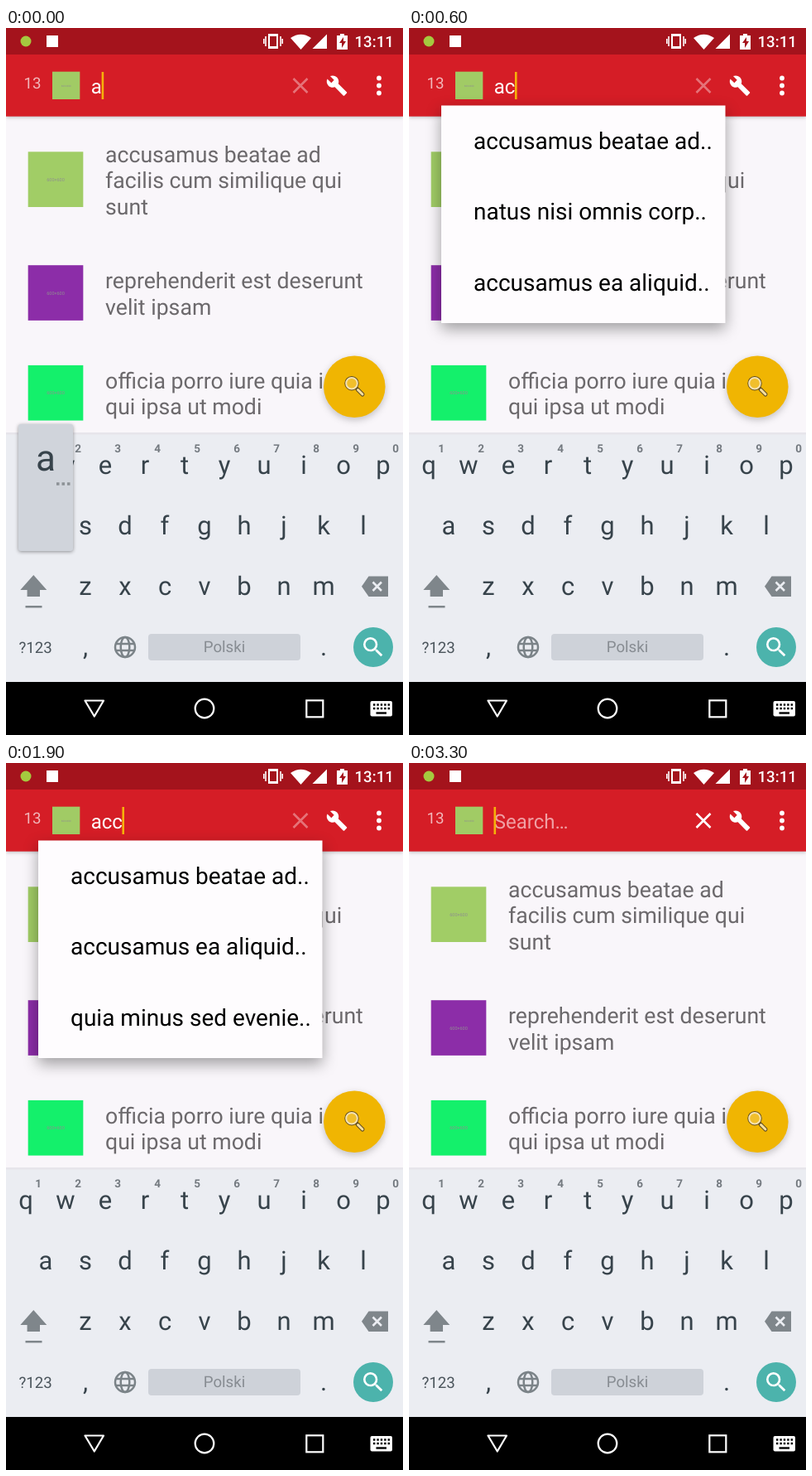
An HTML page that plays this animation: 480 by 853 pixels, repeating every 3.4 s.

```html
<!DOCTYPE html>
<html lang="en">
<head>
<meta charset="utf-8">
<title>Search suggestions</title>
<style>
html, body { margin: 0; width: 100%; height: 100%; overflow: hidden; background: #000 }
svg { display: block; width: 480px; height: 853px; font-family: Roboto, sans-serif; text-rendering: geometricPrecision }
.mid { text-anchor: middle }
.list { font-size: 26.67px; fill: #6c696c }
.keys { font-size: 31px; fill: #37434b }
.digits { font-size: 13.5px; font-weight: 700; fill: #747a80 }
.tiny { font-size: 5.5px; fill: #8f8f8f }
#drop { transform-origin: 169px 59px; font-size: 28px }
#panel { filter: drop-shadow(0 7px 9px rgba(0,0,0,.36)) }
#bubble rect { filter: drop-shadow(0 1.5px 2px rgba(0,0,0,.4)) }
#fab { filter: drop-shadow(0 3px 4px rgba(0,0,0,.22)) }
#bar { filter: drop-shadow(0 1.5px 2px rgba(0,0,0,.25)) }
</style>
</head>
<body>
<svg viewBox="0 0 480 853">
  <rect width="480" height="853" fill="#f9f6fa"/>

  <g id="rows" class="list"></g>
  <circle id="fab" cx="421.300" cy="432.700" r="37.300" fill="#f0b502"/>
  <g fill="none" stroke-linecap="round">
    <path d="M425 436L431 442" stroke="#5c4a20" stroke-width="5"/>
    <circle cx="418" cy="428.700" r="6.800" stroke="#5c4a20" stroke-width="3.800"/>
    <path d="M425.500 436.500L431 442" stroke="#f6dfa0" stroke-width="3"/>
    <circle cx="418" cy="428.700" r="6.800" fill="#f1bf2c" stroke="#f6e2b0" stroke-width="2"/>
  </g>

  <rect id="bar" y="32" width="480" height="74.670" fill="#d51d26"/>
  <rect width="480" height="32" fill="#a4131c"/>
  <circle cx="24" cy="16" r="6.500" fill="#a5c93f"/>
  <rect x="49" y="9" width="14" height="14" fill="#fff"/>
  <g fill="#fff">
    <path d="M317 7h12v18h-12zM319 10v12h8v-12z" fill-rule="evenodd"/>
    <path d="M314 10v12M332 10v12M311.800 13v6M334.200 13v6" stroke="#fff" stroke-width="1.600"/>
    <path d="M344 12Q356.500 3.500 369 12L356.500 26z"/>
    <path d="M388 7.500V25H370.500z"/>
    <path d="M400 9h4v-2h5v2h4v17h-13zM408 11l-5 7h3v6l5-8h-3z" fill-rule="evenodd"/>
    <text x="421.500" y="23" font-size="18.670" font-weight="500">13:11</text>
    <text x="21.500" y="72.700" font-size="18.670" opacity=".68">13</text>
    <circle cx="451" cy="60.500" r="2.900"/>
    <circle cx="451" cy="69.500" r="2.900"/>
    <circle cx="451" cy="78.500" r="2.900"/>
    <path transform="translate(386.700 56.200) scale(1.110)" d="M22.700 19l-9.100-9.100c.9-2.300.4-5-1.500-6.900-2-2-5-2.400-7.400-1.300L9 6 6 9 1.600 4.700C.4 7.100.9 10.100 2.900 12.100c1.900 1.900 4.600 2.400 6.900 1.500l9.100 9.100c.4.4 1 .4 1.400 0l2.300-2.300c.5-.4.5-1.100.1-1.400z"/>
  </g>
  <rect x="56" y="52.670" width="33.330" height="33.330" fill="#a1cb65"/>
  <text class="tiny mid" x="72.700" y="70.500" style="font-size:3px">600×600</text>
  <path id="cross" d="M347.500 61l17 17M364.500 61l-17 17" stroke="#fff" stroke-width="2.600"/>
  <text id="query" x="102.700" y="78.500" font-size="24"></text>
  <rect id="caret" y="53" width="2.600" height="33" fill="#f6b00a"/>

  <g id="drop">
    <rect id="panel" x="39" y="93.500" width="343.500" height="262.500" fill="#fefcfe"/>
    <text x="78" y="146"></text>
    <text x="78" y="231.300"></text>
    <text x="78" y="316.700"></text>
  </g>

  <rect y="488" width="480" height="3" fill="#e7e5eb"/>
  <rect y="490.500" width="480" height="299" fill="#ebedf2"/>
  <g id="keys" class="keys mid"></g>
  <g id="digits" class="digits mid"></g>
  <g fill="#7f868b">
    <path d="M33.300 660L49.300 678H41V686H25.600V678H17.300z"/>
    <rect x="23.500" y="697" width="20" height="2.500"/>
    <path d="M438.500 661.500H462V686H438.500L430 673.800z"/>
  </g>
  <path d="M443.500 668.500l10.500 10.500M454 668.500l-10.500 10.500" stroke="#ebedf2" stroke-width="2.600"/>
  <text x="15.500" y="754" font-size="18.670" fill="#4b555c">?123</text>
  <g fill="none" stroke="#7b8388" stroke-width="2.500">
    <circle cx="144" cy="747" r="12"/>
    <ellipse cx="144" cy="747" rx="5.300" ry="12"/>
    <path d="M133 743h22M133 751h22"/>
  </g>
  <rect x="172" y="731" width="184" height="32" rx="4" fill="#ced2d9"/>
  <text class="mid" x="264" y="753" font-size="18.670" fill="#878c92">Polski</text>
  <circle cx="444" cy="747" r="24" fill="#4cb3ac"/>
  <path transform="translate(428 731) scale(1.333)" fill="#fff" d="M15.500 14h-.79l-.28-.27A6.470 6.470 0 0 0 16 9.500 6.500 6.500 0 1 0 9.500 16c1.610 0 3.090-.59 4.230-1.570l.27.28v.79l5 4.990L20.490 19l-4.990-5zm-6 0C7.010 14 5 11.990 5 9.500S7.010 5 9.500 5 14 7.010 14 9.500 11.990 14 9.500 14z"/>
  <g id="bubble">
    <rect x="-33" y="-123" width="66" height="153" rx="3" fill="#d0d4db"/>
    <text class="mid" y="-67.500" font-size="44" fill="#37434b"></text>
    <path d="M13 -51h3.500M19.500 -51h3.500M26 -51h3.500" stroke="#8c9196" stroke-width="3.500"/>
  </g>

  <rect y="789" width="480" height="64"/>
  <g fill="none" stroke="#fff" stroke-width="2.200">
    <path d="M95.500 811.500H118L106.800 830.500z" stroke-linejoin="round"/>
    <circle cx="240" cy="821" r="11.300"/>
    <rect x="363.300" y="811.300" width="20" height="20"/>
  </g>
  <rect x="440.500" y="812" width="26.500" height="18.500" rx="2" fill="#fff"/>
  <path d="M444 816.500h20M444 821h20" stroke="#000" stroke-width="2.400" stroke-dasharray="2.400 2"/>
  <path d="M447.500 826.500h12.500" stroke="#000" stroke-width="2.400"/>
</svg>
<script>
const $ = id => document.getElementById(id);
const label = (x, y, s) => `<text x="${x}" y="${y}">${s}</text>`;

// Each row: picture top, picture colour, first baseline, lines of text.
const rows = [
  [149.33, '#a1cd66', 161.5, ['accusamus beatae ad', 'facilis cum similique qui', 'sunt']],
  [286.2, '#8c2da8', 314, ['reprehenderit est deserunt', 'velit ipsam']],
  [406.9, '#14f06b', 434.7, ['officia porro iure quia iste', 'qui ipsa ut modi']]
];
$('rows').innerHTML = rows.map(([top, color, base, lines]) =>
  `<rect x="26.670" y="${top}" width="66.670" height="66.670" fill="${color}"/>
   <text class="tiny mid" x="60" y="${top + 35.5}">600×600</text>` +
  lines.map((s, i) => label(120, base + i * 31.56, s)).join('')).join('');

const keyRow = (s, x, y) => [...s].map((c, i) => label(x + i * 48, y, c)).join('');
$('keys').innerHTML = keyRow('qwertyuiop', 24, 537.5) + keyRow('asdfghjkl', 48, 610.5) +
  keyRow('zxcvbnm', 96, 683.5) + label(96, 757, ',') + label(384, 757, '.');
$('digits').innerHTML = keyRow('1234567890', 39, 512);

const best = 'accusamus beatae ad..', second = 'accusamus ea aliquid..';
const hits = [
  [best, 'reprehenderit est dese..', 'officia porro iure quia..'],
  [best, 'natus nisi omnis corp..', second],
  [best, second, 'quia minus sed evenie..']
];
const lines = $('drop').querySelectorAll('text');

function setBubble(key, x, y) {
  const b = $('bubble');
  b.style.display = key ? '' : 'none';
  b.querySelector('text').textContent = key;
  b.setAttribute('transform', `translate(${x} ${y})`);
}

function draw(t) {
  const query = t < 500 ? 'a' : t < 800 ? 'ac' : t < 2300 ? 'acc' : '';
  $('query').textContent = query || 'Search…';
  $('query').setAttribute('fill', query ? '#fff' : '#f0a0a4');
  $('caret').setAttribute('x', [102.5, 115.6, 128, 140.4][query.length]);
  const blinkOff = (t >= 1400 && t < 1900) || (t >= 2800 && t < 3300);
  $('caret').style.display = blinkOff ? 'none' : '';

  const idle = t >= 3000 || (t >= 1700 && t < 1800);
  $('cross').style.opacity = idle ? 1 : t >= 1800 && t < 1900 ? .7 : .38;

  const [alpha, scale] = t < 100 ? [0, 1] : t < 200 ? [.45, .96] : t < 300 ? [.92, .992] :
    t < 2300 ? [1, 1] : t < 2400 ? [.19, .915] : [0, 1];
  $('drop').style.opacity = alpha;
  $('drop').style.transform = `scale(${scale})`;
  hits[t < 600 ? 0 : t < 900 ? 1 : 2].forEach((s, i) => lines[i].textContent = s);

  if (t < 100) setBubble('a', 48, 601);
  else setBubble((t >= 400 && t < 600) || (t >= 800 && t < 900) ? 'c' : '', 192, 674);
}

const start = performance.now();
function tick() {
  draw(Math.floor((performance.now() - start) % 3400 / 100) * 100);
  requestAnimationFrame(tick);
}
tick();
</script>
</body>
</html>
```
